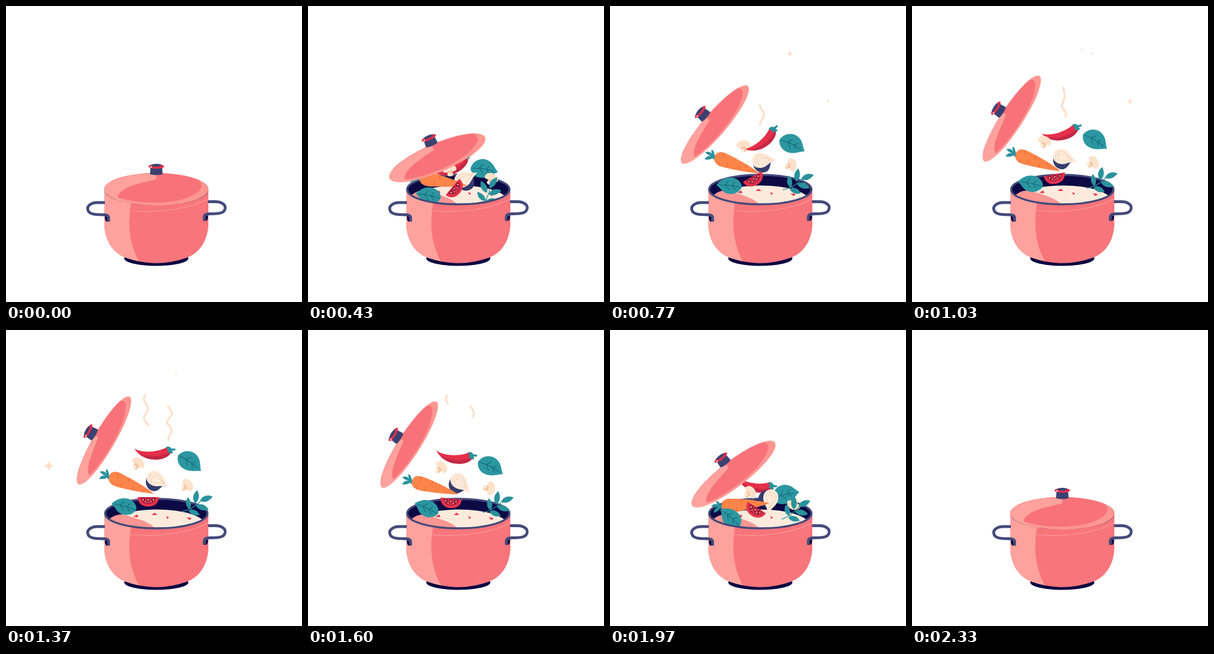
Recreate the animation shown at these times as an HTML page without scripts. Size 512x512 px, loop 2900 ms.

```html
<!DOCTYPE html>
<html lang="en">
<head>
<meta charset="utf-8">
<title>Cooking pot</title>
<style>
html, body { margin: 0; width: 100%; height: 100%; overflow: hidden; background: #fff; }
svg { display: block; width: 100vw; height: 100vh; }
.lid, .dome, .knob, .food, .item, .spark, .steam { animation: 2900ms linear infinite; }

.lid { animation-name: lid; }
@keyframes lid {
  0%, 11.38% { translate: 260px 317px; rotate: 0deg; animation-timing-function: cubic-bezier(.4,.2,.7,.8); }
  14.83% { translate: 224px 263px; rotate: -23deg; animation-timing-function: cubic-bezier(.2,.5,.5,.92); }
  26.55% { translate: 181.5px 205px; rotate: -49.4deg; animation-timing-function: cubic-bezier(.2,.5,.5,1); }
  47.24% { translate: 169.5px 191px; rotate: -59.7deg; animation-timing-function: cubic-bezier(.5,0,.8,.65); }
  61.03% { translate: 186.5px 213px; rotate: -53deg; animation-timing-function: cubic-bezier(.4,.22,.7,.6); }
  67.93% { translate: 213.5px 249px; rotate: -37.6deg; animation-timing-function: cubic-bezier(.33,.36,.65,.95); }
  80.34%, 100% { translate: 260px 317px; rotate: 0deg; }
}
.dome { animation-name: dome; }
@keyframes dome {
  0%, 11.38%, 80.34%, 100% { scale: 1 1; }
  14.83% { scale: 1 .88; }
  26.55% { scale: .975 .71; }
  47.24% { scale: .975 .66; }
  61.03% { scale: .975 .7; }
  67.93% { scale: 1 .81; }
}
.knob { animation-name: knob; }
@keyframes knob {
  0%, 11.38%, 80.34%, 100% { translate: 0 0; }
  14.83% { translate: 0 2px; }
  26.55% { translate: 0 6px; }
  47.24% { translate: 0 7.5px; }
  61.03% { translate: 0 6.5px; }
  67.93% { translate: 0 3.5px; }
}
.food { animation-name: food; }
@keyframes food {
  0%, 11.37% { visibility: hidden; translate: 0 50px; }
  11.38% { visibility: visible; translate: 0 50px; }
  14.83%, 67.93% { visibility: visible; translate: 0 0; }
  80.33% { visibility: visible; translate: 0 50px; }
  80.34%, 100% { visibility: hidden; translate: 0 50px; }
}
/* every ingredient passes through five poses */
.item { animation-name: toss; }
@keyframes toss {
  0%, 14.83% { translate: var(--a); rotate: var(--ra); animation-timing-function: cubic-bezier(.2,.5,.5,.92); }
  26.55% { translate: var(--b); rotate: var(--rb); animation-timing-function: cubic-bezier(.25,.4,.6,1); }
  47.24% { translate: var(--c); rotate: var(--rc); animation-timing-function: cubic-bezier(.5,0,.8,.65); }
  61.03% { translate: var(--d); rotate: var(--rd); animation-timing-function: cubic-bezier(.4,.25,.7,.65); }
  67.93%, 100% { translate: var(--e); rotate: var(--re); }
}
.spark { animation-name: pop; scale: 0; fill: #fddfc8; }
@keyframes pop {
  0% { scale: 0; }
  8.62% { scale: 1; }
  17.24%, 100% { scale: 0; }
}
.steam {
  animation-name: rise; fill: none; stroke: #fde0cc; stroke-width: 3.4; stroke-linecap: round;
  stroke-dasharray: 100 300; stroke-dashoffset: 108;
}
@keyframes rise {
  0% { stroke-dashoffset: 108; opacity: 1; }
  10%, 13% { stroke-dashoffset: 0; opacity: 1; }
  22% { stroke-dashoffset: -108; opacity: 1; }
  22.01%, 100% { stroke-dashoffset: -108; opacity: 0; }
}

.carrot { --a: 234px 303px; --ra: 8deg; --b: 220px 274px; --rb: 19deg; --c: 217px 267px; --rc: 20deg; --d: 225px 281px; --rd: 4deg; --e: 234px 301px; --re: -5deg; }
.chili { --a: 246px 274px; --ra: -30deg; --b: 257px 230px; --rb: -36deg; --c: 253px 206px; --rc: 0deg; --d: 252px 226px; --rd: 19deg; --e: 250px 261px; --re: 13deg; }
.shroom1 { --a: 245px 284px; --ra: -10deg; --b: 231px 242px; --rb: 0deg; --c: 228px 231px; --rc: 35deg; --d: 234px 252px; --rd: 78deg; --e: 242px 281px; --re: 55deg; }
.shroom2 { --a: 317px 299px; --ra: 20deg; --b: 313px 275px; --rb: 75deg; --c: 313px 269px; --rc: 55deg; --d: 315.5px 283px; --rd: 178deg; --e: 318px 301px; --re: 205deg; }
.onion { --a: 269px 301px; --ra: -28deg; --b: 261px 268px; --rb: -5deg; --c: 258px 258px; --rc: 30deg; --d: 266px 272px; --rd: 70deg; --e: 277px 291px; --re: 97deg; }
.tomato { --a: 250px 313px; --ra: -50deg; --b: 246px 295px; --rb: -30deg; --c: 246px 289px; --rc: 0deg; --d: 251px 297px; --rd: 18deg; --e: 254px 307px; --re: 32deg; }
.leafR { --a: 304px 282px; --ra: 8deg; --b: 315px 239px; --rb: 25deg; --c: 318px 228px; --rc: 35deg; --d: 311px 253px; --rd: 10deg; --e: 303px 284px; --re: -14deg; }
.leafL { --a: 208px 328px; --ra: 6deg; --b: 206px 311px; --rb: 0deg; --c: 204px 305px; --rc: 10deg; --d: 207px 315px; --rd: 40deg; --e: 208px 324px; --re: 36deg; }
.sprig { --a: 313px 322px; --ra: -35deg; --b: 326px 305px; --rb: 0deg; --c: 331px 301px; --rc: 0deg; --d: 326px 306px; --rd: 0deg; --e: 322px 311px; --re: -7deg; }
</style>
</head>
<body>
<svg viewBox="0 0 512 512">
  <defs>
    <path id="body" d="M170 317V380C172 408 186 427 206 435Q260 454.500 314 435C334 427 348 408 350 380V317A90 27 0 0 1 170 317Z"/>
    <clipPath id="bodyClip"><use href="#body"/></clipPath>
    <ellipse id="lidShape" rx="90" ry="28"/>
    <clipPath id="lidClip"><use href="#lidShape"/></clipPath>
    <path id="star" d="M0-10Q1-1 10 0Q1 1 0 10Q-1 1-10 0Q-1-1 0-10Z"/>
    <path id="blade" d="M-11 0C-5-7 4-7 12 0C4 6-5 6-11 0Z"/>
    <g id="shroom">
      <path d="M-4 0H4L5 9Q0 13-5 9Z" fill="#fdebd9"/>
      <path d="M1 0H4L5 9Q4 11 1 11Z" fill="#f9cda9"/>
      <path d="M-12 0C-12-13 12-13 12 0Q11 4 6 3Q0 1-6 3Q-11 4-12 0Z" fill="#fde2cb"/>
      <path d="M-6 3Q0 0 6 3L4 5H-4Z" fill="#f8c49c"/>
    </g>
    <g id="handle" fill="none" stroke="#444a7a" stroke-width="4.800">
      <path d="M171 364H179V373H174Q171 372 171 364Z" fill="#0b0842" stroke="none"/>
      <path d="M171 340H158C147 340 140 346 141.500 352C143 360 152 361 168 361Q177 361 177.500 366V373"/>
    </g>
  </defs>

  <ellipse cx="260" cy="436.500" rx="55.500" ry="13" fill="#0b0842"/>

  <!-- inside of the pot -->
  <ellipse cx="260" cy="317.500" rx="88.500" ry="25.500" fill="#0d0945" stroke="#444a7a" stroke-width="3.400"/>
  <ellipse cx="261" cy="337.500" rx="84" ry="27" fill="#fcebdd"/>
  <path d="M178 328Q188 318 204 319C226 327 246 330 258 343L215 346Z" fill="#fb9692"/>
  <path d="M220 323l7-4 2 5zM252 320l5-4 5 4zM277 322l5 2-3 3zM312 324l9 1-3 4z" fill="#e8364f"/>

  <g class="food">
    <g class="item chili">
      <path d="M-31-1C-18 7 8 6 25-3L32 7C26 16 13 19 2 18C-14 17-25 9-31-1Z" fill="#e43049"/>
      <path d="M-22 7C-6 15 18 14 30 4L32 7C26 16 13 19 2 18C-8 18-17 13-22 7Z" fill="#c42846"/>
      <path d="M24-4C29-5 32-4 33-1L40-1V2L34 3Q37 6 34 8L30 6 27 7 27 2Z" fill="#2a929b"/>
    </g>
    <g class="item shroom1"><use href="#shroom"/></g>
    <g class="item leafR">
      <path d="M-23 3C-21-13-6-19 4-16C15-13 18-4 25 2C15 8 9 16-4 16C-14 16-20 10-23 3Z" fill="#2b97a0"/>
      <path d="M-20 2Q0-2 18 2M-8 0L-2-8M4 0L9-6M-8 0L0 8M4 0L10 6" fill="none" stroke="#15687a" stroke-width="1.200"/>
    </g>
    <g class="item shroom2"><use href="#shroom"/></g>
    <g class="item onion">
      <path d="M-14 2C-14 16-3 22 6 20C14 18 15 10 17 4L26 0Z" fill="#363d6c"/>
      <path d="M28 0C17-2 13-14-1-14C-12-14-17-6-15 3C-12 13 1 14 9 9C15 5 20 2 28 0Z" fill="#fdebdb"/>
      <path d="M19-1C8-5 4-11-3-10C-12-8-12 3-8 8M19-1C8-3 2-6-3-5C-8-3-6 5-2 8M19-1C10 1 5 6 1 5" fill="none" stroke="#f5d2b4" stroke-width="1.100"/>
    </g>
    <g class="item carrot">
      <path d="M-38 1C-45-4-44-9-50-10Q-50-5-46-2C-51-6-55-5-59-2Q-53 2-46 1C-53 2-55 5-56 10Q-48 9-44 4L-38 6Z" fill="#2a929b"/>
      <path d="M-41 0C-41-11-32-13-19-11C4-8 25-4 42 2C24 7 1 10-17 12C-32 14-41 10-41 0Z" fill="#fc8549"/>
      <path d="M-28-11Q-26-6-27-3M-16 11Q-15 6-16 2M-7-9Q-6-5-7-2M4 9Q5 5 4 2M16-4V0M-30 12V7M22 5V2" fill="none" stroke="#ee6a3d" stroke-width="1.300"/>
    </g>
    <g class="item tomato">
      <path d="M-18.500 0H18.500C18 11 10 16.500 0 16.500S-18 11-18.500 0Z" fill="#e4324b"/>
      <path d="M-13 1H13C12 8 7 12 0 12S-12 8-13 1Z" fill="#951a3a"/>
      <path d="M-5 0L-2 11M5 0L2 11" stroke="#e4324b" stroke-width="2"/>
      <path d="M-9 3v3M0 3v3M9 3v3M-5 7v2M5 7v2M0 9v1" stroke="#fbc7b0" stroke-width="1.600"/>
    </g>
    <g class="item leafL">
      <path d="M-22-1C-13-12-4-15 6-14C17-12 22-4 22 2C19 10 11 15 0 14C-11 13-14 4-22-1Z" fill="#2b97a0"/>
      <path d="M-17-1Q2-2 21 3M-7-1L-1-8M5 0L10-7M-7-1L1 7M5 0L11 7" fill="none" stroke="#15687a" stroke-width="1.200"/>
    </g>
    <g class="item sprig" fill="#2a929b">
      <path d="M-27 13Q-10 10 6-5M-12 9L0 13" fill="none" stroke="#2a929b" stroke-width="1.300"/>
      <use href="#blade" transform="translate(-2-12) rotate(-82)"/>
      <use href="#blade" transform="translate(15-9) rotate(-20)"/>
      <use href="#blade" transform="translate(8 6) rotate(18)"/>
      <use href="#blade" transform="translate(-15-1) rotate(-98) scale(.9)"/>
      <use href="#blade" transform="translate(-6 15) rotate(22) scale(.9)"/>
    </g>
  </g>

  <!-- outside of the pot -->
  <use href="#body" fill="#f8757b"/>
  <g clip-path="url(#bodyClip)">
    <path d="M160 310H216V342C211 375 211 408 232 446H160Z" fill="#ffa29d"/>
    <path d="M215 354C265 359 322 350 350 333" fill="none" stroke="#fd9a96" stroke-width="1.200"/>
  </g>
  <path d="M171.500 317.500A88.500 25.500 0 0 0 348.500 317.500" fill="none" stroke="#444a7a" stroke-width="3.400"/>
  <use href="#handle"/>
  <use href="#handle" transform="translate(520.500-1.500) scale(-1 1)"/>

  <!-- steam and sparkles -->
  <path class="steam" style="animation-delay:-2300ms" pathLength="100" d="M260 206C258 196 269 195 266 185C263 178 257 176 260 169C264 160 266 152 261 141"/>
  <path class="steam" style="animation-delay:-1850ms" pathLength="100" d="M246 165C243 157 237 158 239 150C242 143 248 140 245 132C242 125 234 122 241 113"/>
  <path class="steam" style="animation-delay:-1840ms" pathLength="100" d="M281 190C279 182 289 180 286 171C283 163 276 164 280 156C284 149 290 147 286 140Q284 136 280 132"/>
  <g transform="translate(311 82.500) scale(.9)"><use class="spark" style="animation-delay:-2300ms" href="#star"/></g>
  <g transform="translate(377 165) scale(.9)"><use class="spark" style="animation-delay:-2210ms" href="#star"/></g>
  <g transform="translate(294 75) scale(.9)"><use class="spark" style="animation-delay:-1940ms" href="#star"/></g>
  <g transform="translate(74 235)"><use class="spark" style="animation-delay:-1800ms" href="#star"/></g>

  <g class="lid">
    <g class="dome">
      <use href="#lidShape" fill="#ff9690"/>
      <g clip-path="url(#lidClip)">
        <path d="M0-30V-17C-30-10-62-5-67 14L-44 27L-95 30V-30Z" fill="#ffa29d"/>
        <path d="M0-17C-30-10-62-5-67 14C-30 26 20 26 50 16C66 10 76 3 78-4C78-9 77-13 73-18L60-30H0Z" fill="#f77379"/>
        <path d="M-78-14C-60-23-40-27-12-27.500" fill="none" stroke="#f77379" stroke-width="1.500"/>
      </g>
    </g>
    <g class="knob">
      <path d="M-10-38H10L11-26Q0-23-11-26Z" fill="#3b4270"/>
      <ellipse cy="-39.500" rx="13.500" ry="4" fill="#e82f4a"/>
      <ellipse cy="-41.500" rx="9" ry="2.500" fill="#3b4270"/>
      <circle cx="-9" cy="-38.500" r="1.200" fill="#fff"/>
    </g>
  </g>
</svg>
</body>
</html>
```
